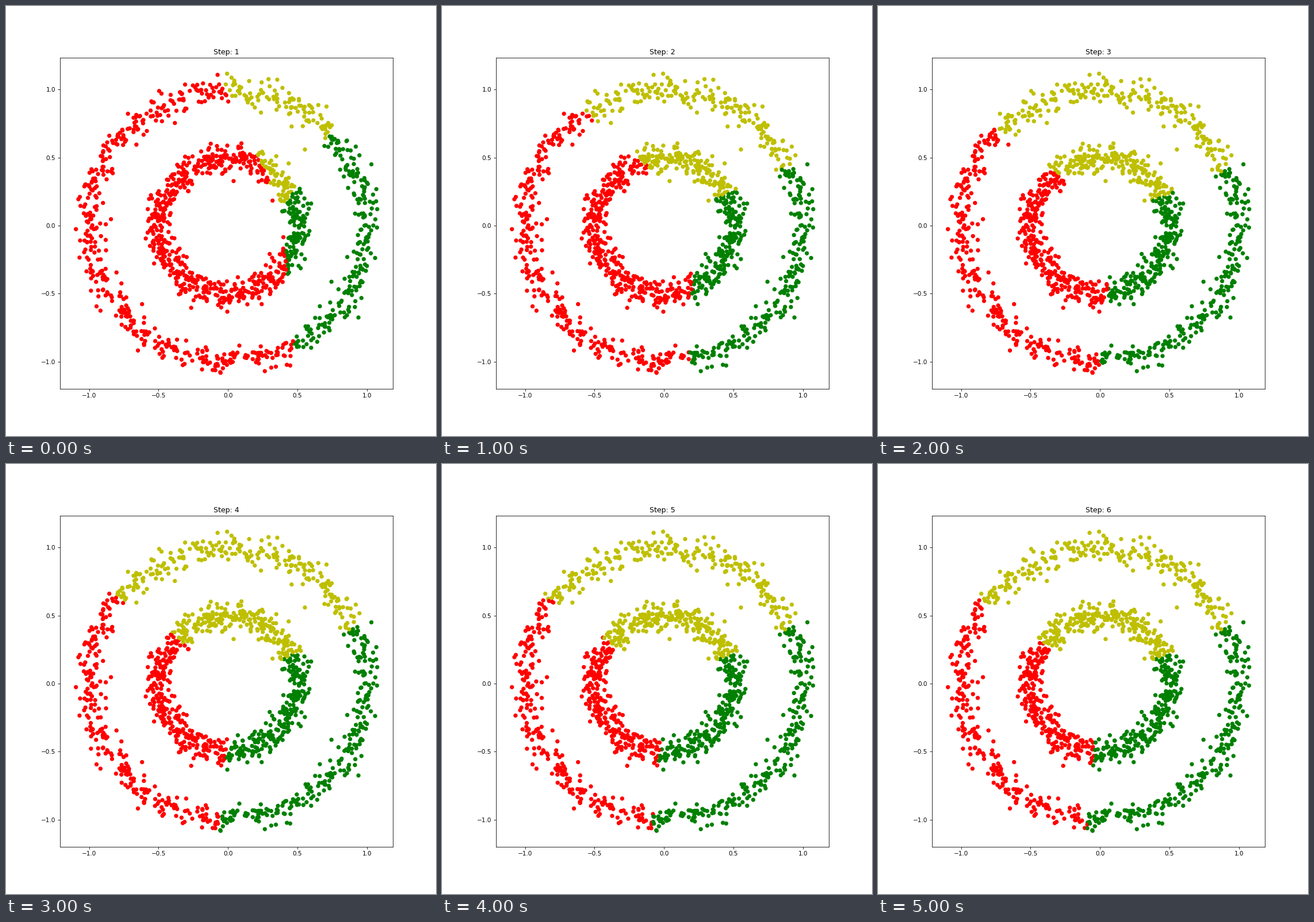
Write a matplotlib script that moves like this. It is 748 px wide and 748 px high and loops after 6 s.

```python
import numpy as np
import matplotlib.pyplot as plt
from matplotlib.animation import FuncAnimation

SIZE, DPI = 748, 74.8
STEPS = 6
SAMPLES = 1500
NOISE = 0.05
TICKS = np.linspace(-1, 1, 5)
COLORS = np.array(["r", "g", "y"])
START = np.array([(0.034, 0.314), (0.700, 0.372), (0.474, 0.517)])


def make_circles(count, factor, noise, seed):
    """Two noisy concentric rings in shuffled order."""
    rng = np.random.RandomState(seed)
    angle = np.linspace(0, 2 * np.pi, count // 2, endpoint=False)
    outer = np.column_stack([np.cos(angle), np.sin(angle)])
    rings = np.vstack([outer, factor * outer])
    rng.shuffle(rings)
    return rings + rng.normal(scale=noise, size=rings.shape)


def nearest(points, centers):
    gaps = points[:, None, :] - centers[None, :, :]
    return np.linalg.norm(gaps, axis=2).argmin(axis=1)


def k_means(points, centers, steps):
    """Cluster label of every point after each step."""
    history = []
    for _ in range(steps):
        labels = nearest(points, centers)
        history.append(labels)
        centers = np.array([points[labels == k].mean(axis=0)
                            for k in range(len(centers))])
    return history


points = make_circles(SAMPLES, 0.5, NOISE, seed=0)
history = k_means(points, START, STEPS)

fig, ax = plt.subplots(figsize=(SIZE / DPI, SIZE / DPI), dpi=DPI)
dots = ax.scatter(points[:, 0], points[:, 1], c=COLORS[history[0]])
title = ax.set_title("Step: 1")
ax.set(xticks=TICKS, yticks=TICKS,
       xlim=(-1.2115, 1.188), ylim=(-1.199, 1.234))


def draw(step):
    dots.set_color(COLORS[history[step]])
    title.set_text(f"Step: {step + 1}")
    return dots, title


anim = FuncAnimation(fig, draw, frames=STEPS, interval=1000,
                     init_func=lambda: draw(0), repeat=True, repeat_delay=0)
plt.show()
```
